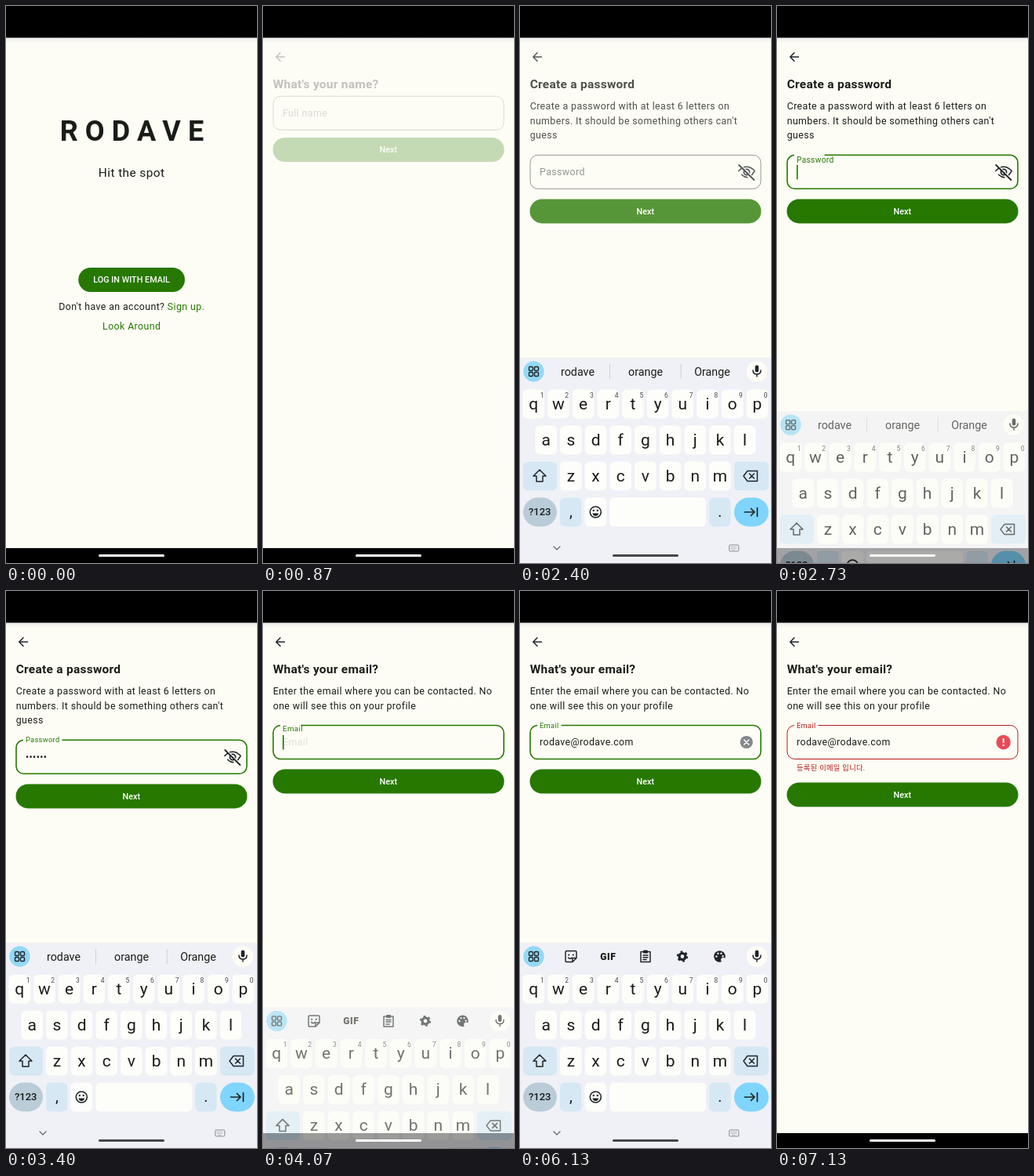
Write an HTML page that moves like this. It is 320 by 711 pixels and loops after 8000 ms.

```html
<!DOCTYPE html>
<html lang="en">
<head>
<meta charset="utf-8">
<title>Sign up flow</title>
<style>
  html, body { margin: 0; width: 100%; height: 100%; overflow: hidden; background: #fdfdf5; }
  svg { display: block; width: 100%; height: 100%; }
  text { font-family: Roboto, "Noto Sans CJK KR", "Noto Sans CJK", sans-serif; fill: #1a1c18; white-space: pre; }
  .body { font-size: 12.39px; letter-spacing: .387px; }
  .head { font-size: 15.5px; font-weight: 700; letter-spacing: .25px; }
  .btn { font-size: 10.84px; font-weight: 500; fill: #fff; text-anchor: middle; }
  .mid { text-anchor: middle; }
  .green { fill: #267800; }
  .line { fill: none; stroke: #1f2428; stroke-width: 1.5; stroke-linecap: round; stroke-linejoin: round; }
</style>
</head>
<body>
<svg id="stage" viewBox="0 0 320 711" xmlns="http://www.w3.org/2000/svg"></svg>
<script>
const LOOP = 8000, STEP = 200 / 3;
const PAGE = '#fdfdf5', GREEN = '#267800', GREY = '#74796d', RED = '#ba1a1a', INK = '#1f2428';
const WORD = 'rodave', MAIL = 'rodave@rodave.com';

const clamp = (v, lo = 0, hi = 1) => Math.min(hi, Math.max(lo, v));
const ramp = (t, start, length) => clamp((t - start) / length);
const easeOut = p => 1 - (1 - p) ** 2;
const mix = (a, b, p) => a + (b - a) * p;
const typed = (t, start, gap, max) => clamp(Math.floor((t - start) / gap) + 1, 0, max);

// Markup helpers
const text = (x, y, str, cls = 'body', extra = '') => `<text x="${x}" y="${y}" class="${cls}" ${extra}>${str}</text>`;
const box = (x, y, w, h, r, fill, extra = '') =>
  `<rect x="${x}" y="${y}" width="${w}" height="${h}" rx="${r}" fill="${fill}" ${extra}/>`;
const dot = (x, y, r, fill, extra = '') => `<circle cx="${x}" cy="${y}" r="${r}" fill="${fill}" ${extra}/>`;
const line = (d, extra = '') => `<path class="line" d="${d}" ${extra}/>`;
const at = (x, y, body, extra = '') => `<g transform="translate(${x} ${y})" ${extra}>${body}</g>`;

const nextButton = id => `<g id="${id}">${box(12.5, 0, 295, 31, 15.5, GREEN)}${text(159.8, 19.4, 'Next', 'btn')}</g>`;
const header = title => at(22, 65, line('M5.5 0H-5M0-5.2L-5.2 0L0 5.2')) + text(12.7, 104.6, title, 'head');

const field = (id, y) => `<g id="${id}" transform="translate(0 ${y})">
  <rect class="frame" x="13" y="0" width="294" height="43" rx="9.5" fill="none"/>
  <rect class="gap" x="22" y="-2" height="5" fill="${PAGE}"/>
  <text class="label" x="25"></text>
  <text class="hint body" x="25" y="25.9">Email</text>
  <text class="value body" x="25" y="25.9"></text>
  <rect class="caret" y="12.5" width="1.6" height="18.5" fill="${GREEN}"/>
  ${at(288.7, 21.5, dot(0, 0, 8.1, '#85898c') + line('M-3-3L3 3M3-3L-3 3', 'style="stroke:#fff"'), 'class="clear"')}
</g>`;

const eyeOff = at(289, 212,
  line('M-10.2-1.5Q0-12 10.2-1.5M-6.5 3.2Q-3 6.6 1 6.8M6 4.5L10-1.3') +
  dot(0, 0, 3.6, 'none', `stroke="${INK}" stroke-width="1.7"`) + dot(.6, .6, 1.4, INK) +
  line('M-8.6-9.4L10.4 9.6', 'style="stroke:#fdfdf5;stroke-width:2"') +
  line('M-9.8-9L9.4 10', 'style="stroke-width:1.8"'));

const errorMark = at(288.7, 21.5, dot(0, 0, 9.2, '#ea4a58') +
  box(-1, -5.2, 2, 6.4, .9, '#fff') + dot(0, 3.9, 1.2, '#fff'));

const screens = {
  login:
    text(165, 171.6, 'RODAVE', 'mid', 'style="font-size:36px;font-weight:700;letter-spacing:9.2px"') +
    text(160.2, 218, 'Hit the spot', 'mid', 'style="font-size:15.5px;letter-spacing:.387px"') +
    box(92.3, 334, 135.7, 31, 15.5, GREEN) + text(160, 353.4, 'LOG IN WITH EMAIL', 'btn') +
    text(160.2, 387.8, 'Don\'t have an account? <tspan class="green">Sign up.</tspan>', 'body mid') +
    text(160.2, 412.6, 'Look Around', 'body mid green'),
  name: header("What's your name?") + field('nameField', 115.2) + nextButton('nameNext'),
  pass: header('Create a password') +
    ['Create a password with at least 6 letters on', "numbers. It should be something others can't", 'guess']
      .map((s, i) => text(12.7, 132 + i * 18.6, s)).join('') +
    field('passField', 190.3) + eyeOff + nextButton('passNext'),
  email: header("What's your email?") +
    ['Enter the email where you can be contacted. No', 'one will see this on your profile']
      .map((s, i) => text(12.7, 132 + i * 18.6, s)).join('') +
    field('mailField', 171.5) +
    `<g id="error">${at(0, 171.5, errorMark)}${text(25, 228.6, '등록된 이메일 입니다.', '',
      `style="font-size:9.29px;letter-spacing:.31px;fill:${RED}"`)}</g>` +
    nextButton('mailNext')
};

// Keyboard
function keyRow(letters, firstX, y, numbered) {
  return [...letters].map((c, i) => {
    const x = firstX + i * 31.68;
    const num = numbered ? text(x + 10.8, y + 10, (i + 1) % 10, 'mid', 'style="font-size:8.6px;fill:#44484c"') : '';
    return box(x - 13.8, y, 27.6, 37, 6, '#fdfdfa') +
      text(x, y + 25.2, c, 'mid', 'style="font-size:21px"') + num;
  }).join('');
}

const gridIcon = [[-6, -6], [1, -6], [-6, 1], [1, 1]]
  .map(([x, y]) => box(x, y, 5, 5, 1.2, 'none', `stroke="${INK}" stroke-width="1.4"`)).join('');
const ring = (r, w, dash = '') => dot(0, 0, r, 'none', `stroke="${INK}" stroke-width="${w}" stroke-dasharray="${dash}"`);

const toolIcons =
  at(65, 466.5, line('M-7-5.5Q-7-7-5.5-7H5.5Q7-7 7-5.5V2L2 7H-5.5Q-7 7-7 5.5ZM7 2H3.5Q2 2 2 3.5V7M-3.5 1.5Q-1 4 1.5 1.5') +
    dot(-2.8, -2, 1.1, INK) + dot(2.8, -2, 1.1, INK)) +
  text(112.3, 470.8, 'GIF', 'mid', 'style="font-size:12px;font-weight:800;letter-spacing:.5px"') +
  at(160, 466.5, line('M-6-6H6V7H-6ZM-3-1.5H3M-3 1.2H3M-3 4H1') + box(-3, -8, 6, 4, 1, INK)) +
  at(207, 466.5, ring(4, 3.2) + ring(5.9, 2.6, '2.6 3.58')) +
  at(254.5, 466.5, dot(0, 0, 7.3, INK) + dot(4.6, 4.6, 3, '#f0f1f6') +
    [[-4, 0], [-2, -3.8], [2, -3.8], [4.2, -.3]].map(([x, y]) => dot(x, y, 1.2, '#f0f1f6')).join(''));

const suggestions = ['', 'orange', 'Orange'].map((s, i) =>
  text([73.5, 160, 245][i], 471.6, s, 'mid', `style="font-size:14.3px" ${i ? '' : 'id="guess"'}`)).join('') +
  box(114, 457, 1, 19, 0, '#cdd0d6') + box(204.7, 457, 1, 19, 0, '#cdd0d6');

const BLUE = '#d7e8f5';
const keyboard = box(0, 449, 320, 262, 0, '#f0f1f6') +
  dot(17.5, 466.5, 13.2, '#93d9f6') + at(17.5, 466.5, gridIcon) +
  `<g id="tools">${toolIcons}</g><g id="words">${suggestions}</g>` +
  dot(302, 466.5, 13.2, '#fdfdf5') +
  at(302, 466, box(-2.3, -7.5, 4.6, 9, 2.3, INK) + line('M-5-1Q-5 4 0 4Q5 4 5-1M0 4V7')) +
  keyRow('qwertyuiop', 17.3, 489.5, true) + keyRow('asdfghjkl', 33.2, 535.5) + keyRow('zxcvbnm', 64.9, 581.5) +
  box(4, 581.5, 43, 37, 6, BLUE) + at(25, 600, line('M0-8L8 0H4V7H-4V0H-8Z')) +
  box(273, 581.5, 44, 37, 6, BLUE) + at(294, 600, line('M-9 0L-4-6.5H8.5V6.5H-4ZM-1.5-3L4.5 3M4.5-3L-1.5 3')) +
  box(4, 627.5, 43, 37, 18.5, '#b9ccd8') + text(25.2, 650.4, '?123', 'mid', 'style="font-size:13px;font-weight:500"') +
  box(51, 627.5, 27.6, 37, 6, BLUE) + text(65, 652, ',', 'mid', 'style="font-size:20px"') +
  box(82.5, 627.5, 27.6, 37, 6, '#fdfdfa') +
  at(96.3, 646, ring(7, 1.6) + dot(-2.5, -2, 1.2, INK) + dot(2.5, -2, 1.2, INK) + `<path d="M-4 1.5H4Q3 5 0 5Q-3 5-4 1.5Z" fill="${INK}"/>`) +
  box(114.2, 627.5, 123, 37, 6, '#fdfdfa') +
  box(241, 627.5, 27.6, 37, 6, BLUE) + text(255, 652, '.', 'mid', 'style="font-size:20px"') +
  box(273, 627.5, 44, 37, 18.5, '#80d5fd') + at(294.5, 646, line('M-8 0H4M0-4.5L4.5 0L0 4.5M8-5.5V5.5', 'style="stroke-width:1.7"')) +
  at(47, 692, line('M-4-2L0 2L4-2', 'style="stroke:#666a6f;stroke-width:1.3"')) +
  at(272.8, 692, box(-6, -4, 12, 8, 1, 'none', 'stroke="#85898d" stroke-width="1"') +
    line('M-4-1.5H4M-4 .5H4M-2 2.4H2', 'style="stroke:#85898d;stroke-width:1;stroke-dasharray:1 1;stroke-linecap:butt"'));

const stage = document.getElementById('stage');
stage.innerHTML =
  `<linearGradient id="shade" x2="0" y2="1"><stop stop-color="#e9ebe9"/><stop offset="1" stop-color="${PAGE}"/></linearGradient>` +
  box(0, 0, 320, 711, 0, PAGE) + box(0, 40, 320, 7, 0, 'url(#shade)') +
  Object.entries(screens).map(([id, body]) => `<g id="${id}">${body}</g>`).join('') +
  box(0, 0, 320, 40.5, 0, '#000') + box(0, 692, 320, 19, 0, '#000') +
  `<g id="keyboard">${keyboard}</g>` + box(118, 700, 84, 3, 1.5, '#fff', 'id="pill"');

const $ = id => document.getElementById(id);
const set = (el, attrs) => { for (const k in attrs) el.setAttribute(k, attrs[k]); };
const show = (el, on) => set(el, { visibility: on ? 'visible' : 'hidden' });

function drawField(id, s) {
  const part = name => $(id).querySelector('.' + name);
  const color = s.error ? RED : s.focus ? GREEN : GREY;
  const label = part('label'), value = part('value');
  set(part('frame'), { stroke: color, 'stroke-width': s.focus ? 1.6 : 1 });
  label.textContent = s.label;
  label.style.cssText = `fill:${color};font-size:${mix(12.39, 9.29, s.float)}px;letter-spacing:${mix(.387, .31, s.float)}px`;
  set(label, { y: mix(25.9, 3.1, s.float) });
  set(part('gap'), { width: s.float ? (label.getComputedTextLength() + 6) * s.float : 0 });
  value.textContent = s.value;
  set(part('caret'), { x: 25 + (s.value ? value.getComputedTextLength() : 0) });
  part('caret').style.opacity = s.caret ? 1 : 0;
  part('clear').style.opacity = s.clear && s.value ? 1 : 0;
  part('hint').style.cssText = `fill:${GREY};opacity:${s.hint && !s.value ? s.hint : 0}`;
}

const ORDER = ['login', 'name', 'pass', 'email'];
const SWAPS = [773, 2240, 3507];
const FOCUS = [1225, 2640, 3960];
const KEYS_UP = [[1230, 2430], [2650, 3640], [3992, 6250]];

function drawScreens(t) {
  ORDER.forEach((id, i) => {
    const inn = i ? ramp(t, SWAPS[i - 1] + 60, 130) : 1;
    const out = i < 3 ? ramp(t, SWAPS[i], 90) : 0;
    $(id).style.opacity = inn * (1 - out);
  });
}

function drawKeyboard(t, nameCount) {
  const up = Math.max(...KEYS_UP.map(([a, b]) => easeOut(ramp(t, a, 170)) * (1 - easeOut(ramp(t, b, 170)))));
  set($('keyboard'), { transform: `translate(0 ${262 * (1 - up)})`, opacity: up ** 1.3 });
  const words = nameCount > 1 && t < 3820;
  show($('words'), words);
  show($('tools'), !words);
  $('guess').textContent = WORD.slice(0, nameCount);
  const dark = KEYS_UP.some(([a, b]) => t > a + 200 && t < b + 60);
  set($('pill'), { fill: dark ? '#45474b' : '#fff' });
}

function draw(t) {
  const nameCount = typed(t, 1395, 100, 6);
  const passCount = typed(t, 2925, 80, 6);
  const mailCount = typed(t, 4320, 70, 6) + (t > 5195 ? 1 : 0) + typed(t, 5395, 59, 10);
  const failed = t > 6930;
  const lift = FOCUS.map(f => ramp(t, f, 130));

  drawScreens(t);
  drawField('nameField', {
    label: 'Full name', value: WORD.slice(0, nameCount), float: lift[0],
    focus: lift[0] > 0, caret: lift[0] > 0 && t < 2060, clear: true
  });
  drawField('passField', {
    label: 'Password', value: '•'.repeat(passCount), float: lift[1],
    focus: lift[1] > 0, caret: lift[1] > 0 && t < 3390
  });
  drawField('mailField', {
    label: 'Email', value: MAIL.slice(0, mailCount), float: lift[2],
    focus: lift[2] > 0 && t < 6260, caret: lift[2] > 0 && t < 6120,
    clear: !failed, error: failed, hint: .8 * ramp(t, 4040, 100)
  });
  show($('error'), failed);
  const place = (id, y) => set($(id), { transform: `translate(0 ${y})` });
  place('nameNext', 168);
  place('passNext', 246.4);
  place('mailNext', failed ? 244.5 : 227.5);
  drawKeyboard(t, nameCount);
}

function tick() {
  const now = performance.now() % LOOP;
  draw(Math.floor((now + 4) / STEP) * STEP);
  requestAnimationFrame(tick);
}
tick();
</script>
</body>
</html>
```
